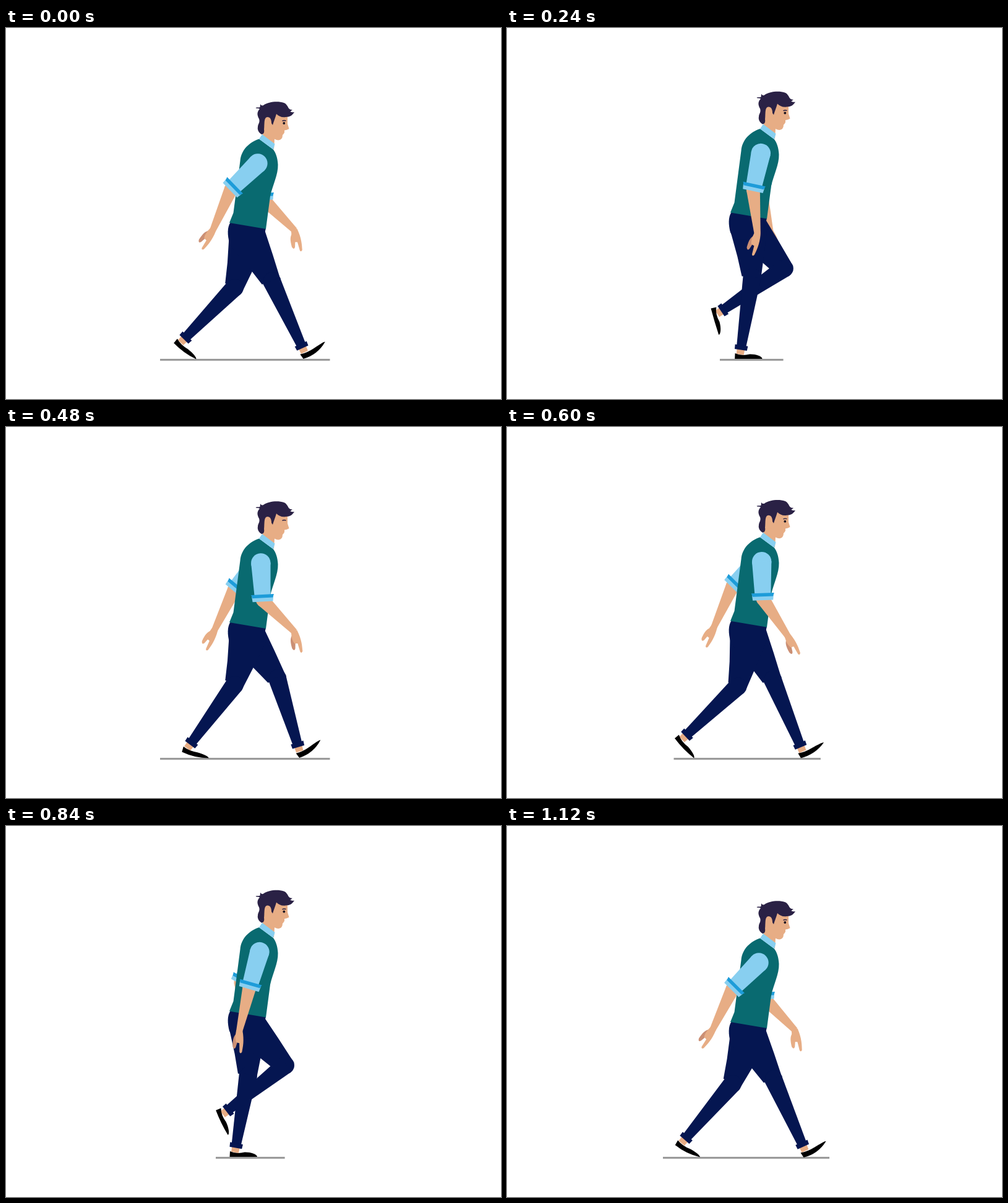
Animation, 800 px wide and 600 px high, one loop 1.16 s. Source, as an HTML page with a canvas:

```html
<!DOCTYPE html>
<html lang="en">
<head>
<meta charset="utf-8">
<title>Walk cycle</title>
<style>
  html, body { margin: 0; width: 100%; height: 100%; overflow: hidden; background: #fff; }
  canvas { display: block; }
</style>
</head>
<body>
<canvas id="stage" width="800" height="600"></canvas>
<script>
const ctx = document.getElementById('stage').getContext('2d');
const LOOP = 1160, STEP = 40;
const SKIN = '#e7ad85', PALM = '#cb8f74', HAIR = '#2a2145', VEST = '#096a70';
const SHIRT = '#88cff0', TRIM = '#1d9cd9', NAVY = '#051651', SHOE = '#000', GROUND = '#9b9b9b';

// time, vertical body shift
const BOB = [[0, 14], [160, 0], [240, -2.5], [360, 5], [480, 15], [540, 16.2],
  [680, 5], [820, -1.7], [840, -1.5], [1120, 16]];

// time, left end of the ground line
const LINE = [[0, 249], [160, 332], [240, 344], [360, 286], [480, 249], [540, 249],
  [680, 313], [800, 342], [840, 339], [1120, 252]];

// time, knee x, knee y, ankle x, ankle y, foot angle, sole bend
const LEG = [
  [0, 430, 409, 480, 519, -38, 9],
  [100, 429, 399, 424.5, 522, 0, 0],
  [160, 427, 404, 404, 522, 0, 0],
  [260, 392, 403, 371, 522, 0, 0],
  [360, 386, 408, 338, 522, 1, 0],
  [480, 370, 417, 296.5, 515, 13, 5],
  [540, 365, 417, 286, 508.5, 26, 5],
  [580, 370, 420, 286.5, 504.5, 36, 4],
  [680, 394, 412, 291.5, 481, 92, -3],
  [740, 419, 402, 312, 450.5, 99, -11],
  [840, 452, 387, 355, 462.5, 64, 2],
  [940, 456, 383, 431, 502, -1, 0],
  [1060, 439, 406, 473, 519, -40, 9],
  [1120, 431, 409, 479.5, 520, -36, 9]
];

// time, upper arm, forearm and hand angles from straight down
const NEAR_ARM = [[0, -46, -24, -35], [160, -25, -12, -32], [360, 2, 35, 8], [480, 3, 45, 13],
  [680, 0, 20.6, 32], [840, -16, -13, -3], [1120, -45, -26, -36]];
const FAR_ARM = [[0, 3, 45, 12], [160, 4, 30, 32], [360, -20, -15, -14], [480, -40, -26, -28],
  [680, -46, -22, -26], [840, -29, 8, 0], [1120, 3, 44, 10]];

const HEAD = new Path2D('M417 140 L437 120 L455 125 L455 141 L457.5 149 Q454 151 450 151.5 L450 155 L448.5 157.5 L447 159 Q447 167 440 167.5 Q436 167 434 165.5 L433 182 L413 165 L417 150Z');
const MOP = new Path2D('M413 158 C408 155 406 150 407 146 C407 141 411 139 409 133 C405 126 406 121 410 117 C408 115 405 117 403.5 115 C406 114 409 115 410.5 114 L411 109 C412 111 414 112 416 111 C424 105 440 104 449 107 C454 109 455 113 457 116 C459 118 461 118.5 463 118 C461 120 460 121 459 121 C462 122.5 464 122.5 466 122 C463 127 459 130 452 130 C446 131 441 129 437 125 C435 132 433 136 431 143 L427 137 L418 141 L417 150 C418 155 416 158 413 158Z');
const EAR = new Path2D('M418 152 C417 140 417 130 422.5 130 C427 130 429 134 429 140 L429 152Z');
const TORSO = new Path2D('M409 165.5 C393 171 380 183 378.5 201 L367.5 285 L361 301 L420 311 L427 258 C431 240 440 223 439.5 207 C439 196 436 188 432 182.5Z');
const COLLAR = new Path2D('M414 158 L409 165.5 L432 182.5 L434.5 173.5Z');
const SEAT = new Path2D('M363 300 C357 308 358 322 361 333 L368 345 L395 345 L415 330 L420 310Z');
const HAND = new Path2D('M-5 -1 C-6 7 -7 12 -4 19 L1 20 L2 34 Q3.5 38 6 34 C7 26 9 16 5 -1Z');
const THUMB = new Path2D('M-4 4 C-9 9 -10 14 -9.5 26 Q-7 32 -4.5 27 L-2 17 L0 10Z');

// Periodic monotone cubic through the keys; returns all columns after the time.
function sample(keys, time) {
  const t = ((time % LOOP) + LOOP) % LOOP, n = keys.length;
  let i = n - 1;
  while (keys[i][0] > t) i--;
  const row = j => keys[(j + n) % n];
  const when = j => row(j)[0] + LOOP * Math.floor(j / n);
  const rate = (j, c) => (row(j + 1)[c] - row(j)[c]) / (when(j + 1) - when(j));
  const slope = (j, c) => {
    const a = rate(j - 1, c), b = rate(j, c);
    return a * b > 0 ? 2 * a * b / (a + b) : 0;
  };
  const h = when(i + 1) - when(i), u = (t - when(i)) / h;
  const w = u * u * (3 - 2 * u);
  return keys[i].slice(1).map((v, k) => {
    const c = k + 1;
    return v * (1 - w) + row(i + 1)[c] * w
      + h * u * (1 - u) * ((1 - u) * slope(i, c) - u * slope(i + 1, c));
  });
}

function fill(path, color) {
  ctx.fillStyle = color;
  ctx.fill(path);
}

function poly(color, ...pts) {
  ctx.beginPath();
  pts.forEach(p => ctx.lineTo(p[0], p[1]));
  ctx.closePath();
  ctx.fillStyle = color;
  ctx.fill();
}

function disc(color, x, y, rx, ry = rx) {
  ctx.beginPath();
  ctx.ellipse(x, y, rx, ry, 0, 0, 7);
  ctx.fillStyle = color;
  ctx.fill();
}

// Draws in a frame moved to x, y and turned clockwise by an angle in radians.
function placed(x, y, angle, draw) {
  ctx.save();
  ctx.translate(x, y);
  ctx.rotate(angle);
  draw();
  ctx.restore();
}

const rad = deg => deg * Math.PI / 180;

function shoe(bend) {
  ctx.beginPath();
  ctx.moveTo(-9, 4);
  ctx.lineTo(-9.5, 13);
  ctx.quadraticCurveTo(13, 13 + bend, 35, 13);
  ctx.bezierCurveTo(35, 9 + bend * .3, 25, 5.5 + bend * .6, 15, 5.5 + bend * .5);
  ctx.quadraticCurveTo(1, 9, -9, 4);
  ctx.fillStyle = SHOE;
  ctx.fill();
}

function leg(time, dy) {
  const [kx, ky, ax, ay, turn, bend] = sample(LEG, time);
  const hx = 390, hy = 325 + dy;
  const thigh = Math.hypot(kx - hx, ky - hy), shin = Math.hypot(ax - kx, ay - ky);
  const cuff = shin - 5.5;

  placed(kx, ky, -Math.atan2(ax - kx, ay - ky), () =>
    poly(SKIN, [-6.5, cuff], [6.5, cuff], [6, shin + 6], [-6, shin + 6]));
  placed(ax, ay, rad(turn), () => shoe(bend));
  placed(hx, hy, -Math.atan2(kx - hx, ky - hy), () =>
    poly(NAVY, [31, 0], [22, thigh * .55], [14, thigh], [-17, thigh - 3], [-21.5, thigh * .56], [-30, 0]));
  disc(NAVY, kx, ky, 14);
  placed(kx, ky, -Math.atan2(ax - kx, ay - ky), () => {
    poly(NAVY, [14, 0], [7.5, cuff], [-7.5, cuff], [-15.5, -2]);
    poly(NAVY, [-10.5, cuff - 3.5], [10.5, cuff - 3.5], [10, cuff + 4], [-10, cuff + 4]);
  });
}

function arm(keys, time, y, thumb) {
  const [upper, fore, hand] = sample(keys, time);
  const a = rad(upper), f = rad(fore);
  const sx = 411.5 + upper * .1;
  const ex = sx + 60 * Math.sin(a), ey = y + 60 * Math.cos(a);

  placed(ex + 72 * Math.sin(f), ey + 72 * Math.cos(f), -rad(hand), () => {
    fill(THUMB, thumb);
    fill(HAND, SKIN);
  });
  placed(ex, ey, -f, () => {
    disc(SKIN, 0, 0, 11);
    poly(SKIN, [-11, 0], [11, 0], [5, 73], [-5, 73]);
  });
  placed(sx, y, -a, () => {
    disc(SHIRT, 0, 0, 15.7);
    poly(SHIRT, [-15.7, 0], [15.7, 0], [13, 53], [-13, 53]);
    poly(SHIRT, [-17.5, 54], [17.5, 54], [16.5, 62.5], [-16.5, 62.5]);
    poly(TRIM, [-18.5, 51], [18.5, 51], [16.5, 56.5], [-16.5, 56.5]);
  });
}

function head(time) {
  fill(HEAD, SKIN);
  fill(MOP, HAIR);
  fill(EAR, SKIN);
  const open = Math.min(1, Math.abs(time - 480) / 60);
  disc('#1a1420', 449.3, 140, 1.9, 1.9 * open);
  ctx.beginPath();
  ctx.moveTo(446.5, 136.3);
  ctx.quadraticCurveTo(449, 134.8, 452.5, 136);
  ctx.lineWidth = 1.4;
  ctx.strokeStyle = HAIR;
  ctx.stroke();
}

function render(t) {
  const [dy] = sample(BOB, t), [left] = sample(LINE, t);
  ctx.fillStyle = '#fff';
  ctx.fillRect(0, 0, 800, 600);
  ctx.fillStyle = GROUND;
  ctx.fillRect(left, 535, 523.5 - .81 * (left - 249) - left, 3.2);

  arm(FAR_ARM, t, 202 + dy, SKIN);
  leg(t - LOOP / 2, dy);
  leg(t, dy);
  placed(0, dy, 0, () => {
    fill(SEAT, NAVY);
    head(t);
    fill(TORSO, VEST);
    fill(COLLAR, SHIRT);
  });
  arm(NEAR_ARM, t, 205 + dy, PALM);
}

function tick() {
  render(Math.floor(performance.now() / STEP) * STEP % LOOP);
  requestAnimationFrame(tick);
}
tick();
</script>
</body>
</html>
```
